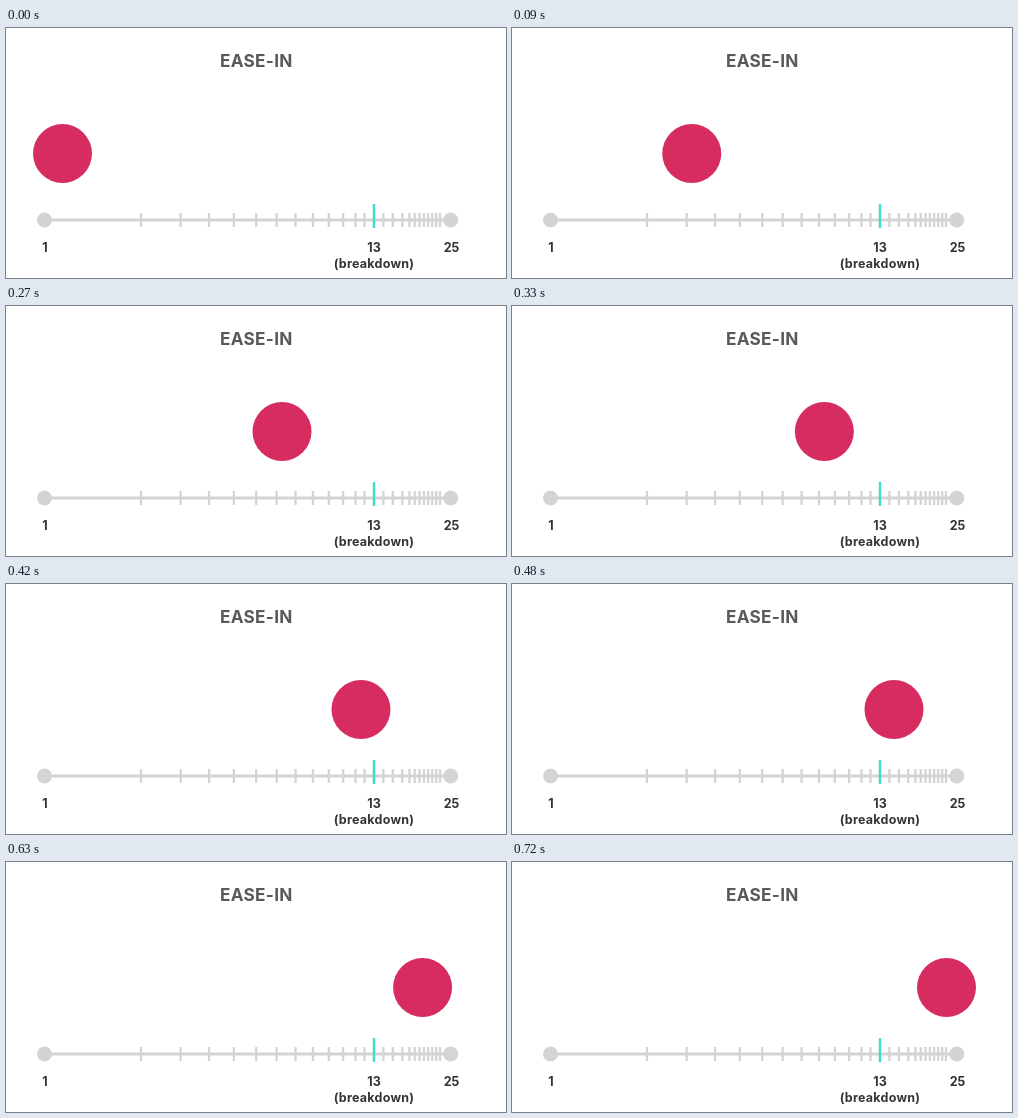
Recreate the animation shown at these times as an HTML page. Size 500 px wide and 250 px high, loop 750 ms.

```html
<!DOCTYPE html>
<html lang="en">
<head>
<meta charset="utf-8">
<title>Ease-in</title>
<style>
  html, body { margin: 0; width: 100%; height: 100%; overflow: hidden; background: #fff; }
  svg { display: block; width: 500px; height: 250px; }
  text { font: 700 12.5px Inter, sans-serif; text-anchor: middle; fill: #343436; }
  .title { font-size: 17.2px; letter-spacing: .3px; fill: #58595b; }
  .note { letter-spacing: .25px; }
  .axis { stroke: #d4d4d4; stroke-width: 2.8; }
  .ticks { stroke: #d4d4d4; stroke-width: 2.3; }
  .end { fill: #d4d4d4; }
  .mark { stroke: #3fdcd0; stroke-width: 2.4; }
</style>
</head>
<body>
<svg viewBox="0 0 500 250">
  <text class="title" x="250.3" y="39">EASE-IN</text>
  <path class="axis" d="M38 192H445"/>
  <path class="ticks" id="ticks"/>
  <circle class="end" cx="38.5" cy="192" r="7.5"/>
  <circle class="end" cx="444.7" cy="192" r="7.5"/>
  <path class="mark" d="M368 176V200"/>
  <text x="39" y="223.5">1</text>
  <text x="368" y="223.5">13</text>
  <text x="445.5" y="223.5">25</text>
  <text class="note" x="368" y="239.5">(breakdown)</text>
  <circle id="ball" cy="125.5" r="29.5" fill="#d72c60"/>
</svg>
<script>
  const STEP = 30, STEPS = 25; // ms per step, steps per loop
  const HOLDS = [0, 1, 6, 7, 17, 19]; // steps on which the ball rests

  // Points after `from` up to `to`; rise < 1 starts faster, settle > 1 ends slower.
  const spread = (from, to, count, rise = 1, settle = 1) =>
    Array.from({ length: count }, (_, i) =>
      from + (to - from) * (1 - (1 - ((i + 1) / count) ** rise) ** settle));

  const ticks = [
    135, ...spread(135, 358.5, 11, .8, 1.23),
    ...spread(358.5, 396.3, 4),
    ...spread(396.3, 434, 8, .8),
  ];
  const stops = [
    56.5, 140, ...spread(140, 364, 11, .8, 1.23),
    ...spread(364, 400, 2),
    ...spread(400, 434.5, 5, .8),
  ];

  document.getElementById('ticks').setAttribute('d', ticks.map(x => `M${x} 185V199`).join(''));
  const ball = document.getElementById('ball');

  function draw() {
    const step = Math.floor(performance.now() / STEP) % STEPS;
    const rests = HOLDS.filter(hold => hold <= step).length;
    ball.setAttribute('cx', stops[step + 1 - rests]);
    requestAnimationFrame(draw);
  }
  draw();
</script>
</body>
</html>
```
